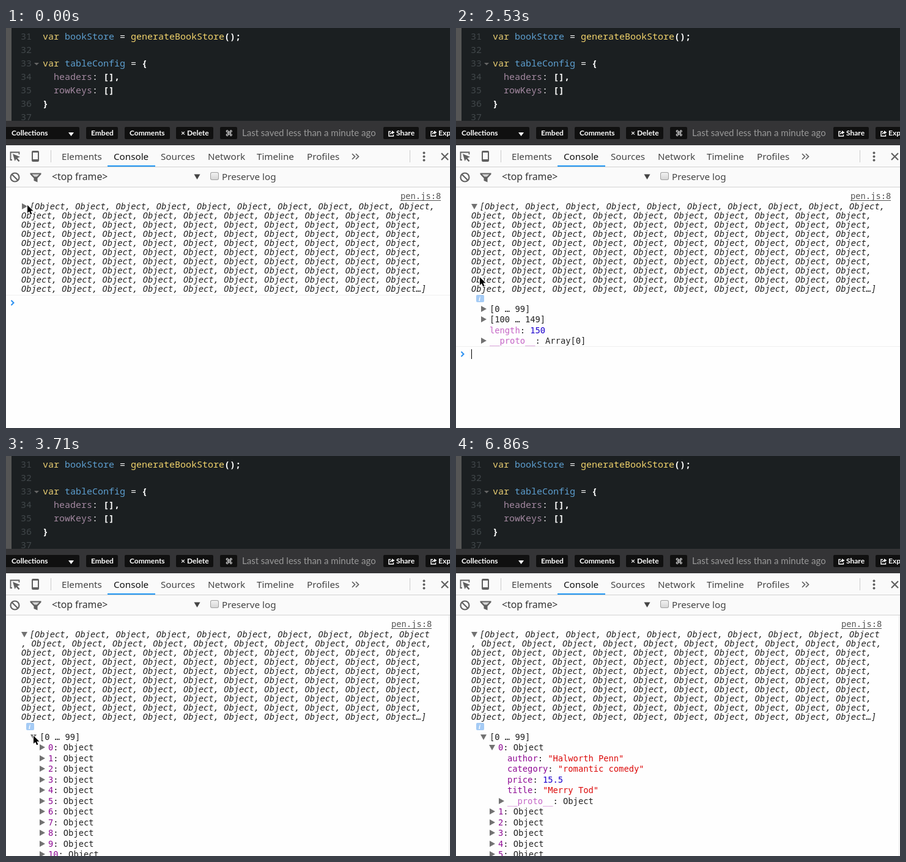
Write an HTML page with a canvas that moves like this. It is 726 px wide and 655 px high and loops after 7460 ms.

```html
<!DOCTYPE html>
<html lang="en">
<head>
<meta charset="utf-8">
<title>Console inspection</title>
<style>
html, body { margin: 0; width: 100%; height: 100%; overflow: hidden; background: #fefefe; }
canvas { display: block; }
</style>
</head>
<body>
<canvas id="stage" width="726" height="655"></canvas>
<script>
const ctx = document.getElementById('stage').getContext('2d');
const LOOP = 7460;
const MONO = '13.75px "DejaVu Sans Mono", monospace';
const CODE = '15px "Noto Sans Mono", monospace';
const LABEL = 'bold 12px Lato, sans-serif';
const TAB = '15.2px "Noto Sans", sans-serif';
const INK = '#222', KEY = '#8e0a94', DIM = '#c565c6', NUM = '#1c00cf', STR = '#dc0a0a';
const ICON = '#606060', WHITE = '#fff';
const ROW = 17.5;

// Pointer tip: [start time, x, y]; hidden where no place is given.
const POINTER = [
  [0, 35, 290], [740, 34, 290], [890, 32, 290], [1040, 31, 289], [1190, 30, 289],
  [2230, 31, 306], [2380, 36, 365], [2530, 39, 408], [2680, 41, 432], [2830, 42, 446],
  [2970, 43, 453], [3120, 44, 457], [3270, 44, 458], [3420, 45, 458],
  [4460, 48, 462], [4610, 54, 469], [4760, 59, 475], [4910, 62, 478],
  [6560, 190, 515], [6710, 566, 623], [6860]
];
const BLINKS = [300, 740, 1190, 1930, 2380, 2830, 3270];

function rect(x, y, w, h, color, radius = 0) {
  ctx.fillStyle = color;
  ctx.beginPath();
  ctx.roundRect(x, y, w, h, radius);
  ctx.fill();
}

function text(str, x, y, color, font) {
  ctx.font = font;
  ctx.fillStyle = color;
  ctx.fillText(str, x, y);
  return x + ctx.measureText(str).width;
}

// Parts alternate between string and colour.
function run(x, y, font, ...parts) {
  for (let i = 0; i < parts.length; i += 2) x = text(parts[i], x, y, parts[i + 1], font);
}

function shape(d, color, x = 0, y = 0, width = 0) {
  ctx.save();
  ctx.translate(x, y);
  const path = new Path2D(d);
  if (width) {
    ctx.strokeStyle = color;
    ctx.lineWidth = width;
    ctx.stroke(path);
  } else {
    ctx.fillStyle = color;
    ctx.fill(path);
  }
  ctx.restore();
}

function disc(x, y, r, color) {
  ctx.fillStyle = color;
  ctx.beginPath();
  ctx.arc(x, y, r, 0, 7);
  ctx.fill();
}

function toggle(x, y, open) {
  shape(open ? 'M-5-4H5L0 5Z' : 'M-4-5 5 0-4 5Z', '#727272', x, y);
}

function drawEditor() {
  const yellow = '#e8cd72', blue = '#5d9fd0', mauve = '#a388a0', bold = 'bold ' + CODE;
  rect(0, 0, 726, 152, '#1b1f21');
  rect(0, 0, 9, 152, '#555');
  for (let i = 0; i < 7; i++) text(31 + i, 24, 19 + 22 * i, '#41474a', CODE);
  shape('M46 57H54L50 61Z', '#666');
  run(60, 19, CODE, 'var ', yellow, 'bookStore ', blue, '= ', WHITE, 'generateBookStore', '#f2d46c');
  text('();', 357, 19, WHITE, bold);
  run(60, 63, CODE, 'var ', yellow, 'tableConfig ', blue, '= ', WHITE);
  text('{', 222, 63, WHITE, bold);
  run(78, 85, CODE, 'headers', mauve, ':', WHITE);
  text('[],', 159, 85, WHITE, bold);
  run(78, 107, CODE, 'rowKeys', mauve, ':', WHITE);
  text('[]', 159, 107, WHITE, bold);
  text('}', 60, 129, WHITE, bold);
}

function drawFooter() {
  rect(0, 152, 726, 40, '#343436');
  for (const [x, w] of [[-4, 124], [131, 52], [194, 74], [278, 61], [350, 28], [617, 58], [686, 50]])
    rect(x, 162, w, 20, '#101010', 2);
  const labels = [['Collections', 9], ['Embed', 139], ['Comments', 202], ['×', 286],
    ['Delete', 296], ['Share', 638], ['Export', 707]];
  for (const [str, x] of labels) text(str, x, 176, WHITE, LABEL);
  text('⌘', 358, 177, WHITE, '13px "DejaVu Sans", sans-serif');
  text('Last saved less than a minute ago', 386, 177, '#999', '15px Lato, sans-serif');
  shape('M102 171H111L106.500 177Z', WHITE);
  for (const x of [625, 694]) {
    shape('M4 1.500H1V9H8.500V6.500M3.500 6Q4 3 7 3', WHITE, x, 168, 1.4);
    shape('M6 0 10.500 3 6 6Z', WHITE, x, 168);
  }
}

function drawTools() {
  rect(0, 192, 726, 69, '#fafafa');
  rect(0, 227, 726, 1, '#d2d2d2');
  rect(0, 260, 726, 1, '#d2d2d2');
  rect(166, 225, 78, 2, '#2196f3');
  rect(73, 200, 1, 20, '#ccc');
  rect(660, 200, 1, 20, '#ccc');
  const tabs = [['Elements', 91], ['Console', 176], ['Sources', 253], ['Network', 330],
    ['Timeline', 410], ['Profiles', 492]];
  for (const [str, x] of tabs) text(str, x, 216, str === 'Console' ? '#111' : '#444', TAB);

  // Inspect, device, overflow, menu and close icons
  shape('M10 216H7.500V203.500H21.500V207', ICON, 0, 0, 1.8);
  shape('M11 206 23 211 18.500 213 22.500 217.500 20.500 219 16.500 214.500 14.500 218Z', ICON);
  rect(42, 201, 12, 18, ICON, 2);
  rect(44, 204, 8, 11, '#fafafa');
  shape('M566 206 570.500 210.500 566 215M572 206 576.500 210.500 572 215', ICON, 0, 0, 1.7);
  for (const y of [204.5, 210.5, 216.5]) disc(683.5, y, 2, ICON);
  shape('M712 205 723 216M723 205 712 216', ICON, 0, 0, 2.2);

  // Clear, filter and frame controls
  ctx.beginPath();
  ctx.arc(14.5, 244.5, 7, 0, 7);
  ctx.strokeStyle = ICON;
  ctx.lineWidth = 2.2;
  ctx.stroke();
  shape('M9.500 239.500 19.500 249.500', ICON, 0, 0, 2.2);
  shape('M39.500 237.500H57.500V239.500L51.500 246V252.500L45.500 250V246L39.500 239.500Z', ICON);
  shape('M42.500 239.500H54.500L50.500 243.500H46.500Z', '#d5d5d5');
  text('<top frame>', 75, 249, '#333', '15.8px "Noto Sans", sans-serif');
  shape('M307.500 239.500H317.500L312.500 248Z', '#444');
  const shade = ctx.createLinearGradient(0, 236, 0, 249);
  shade.addColorStop(0, '#f4f4f4');
  shade.addColorStop(1, '#d4d4d4');
  rect(334, 236, 14, 13, '#a0a0a0', 3);
  rect(335, 237, 12, 11, shade, 2);
  text('Preserve log', 353, 249, '#444', TAB);
}

function drawSummary(open, narrow) {
  const link = narrow ? 630 : 645;
  text('pen.js:8', link, 280, '#555', MONO);
  rect(link, 282, 66, 1, '#555');
  toggle(30, 292, open);
  const list = Array(10).fill('Object').join(', ');
  for (let i = 0; i < 10; i++) {
    let line = list + ',';
    if (i === 0) line = '[' + list + (narrow ? '' : ',');
    if (i === 1 && narrow) line = ', ' + line;
    if (i === 9) line = list + '…]';
    text(line, i ? 25 : 38.7, 297 + 15 * i, INK, 'italic ' + MONO);
  }
  if (open) {
    rect(33, 437, 13, 12, '#a5cbf5', 2);
    text('i', 37, 447, WHITE, 'italic bold 11px "Liberation Serif", serif');
  }
}

function prompt(y, caret) {
  rect(0, y - 13, 726, 1, '#f0f0f0');
  shape('M8.500-4 12.500 0 8.500 4', '#2a8ff0', 0, y, 2);
  if (caret) rect(25, y - 8, 1, 16, '#000');
}

// One tree line; index 0 is the first line under the summary.
function branch(index, x, open, ...parts) {
  const y = Math.round(460 + ROW * index - 0.2);
  if (open !== null) toggle(x - 10, y, open);
  run(x, y + 5, MONO, ...parts);
}

function drawTree(t) {
  const expanded = t >= 3710, detail = t >= 5360;
  branch(0, 55, t >= 3570, '[0 … 99]', INK);
  if (!expanded) {
    branch(1, 55, false, '[100 … 149]', INK);
    branch(2, 55, null, 'length', DIM, ': ', INK, '150', NUM);
    branch(3, 55, false, '__proto__', DIM, ': Array[0]', INK);
    return;
  }
  for (let i = 0; i < 11; i++)
    branch(1 + i + (detail && i ? 5 : 0), 69, detail && !i, String(i), KEY, ': Object', INK);
  if (!detail) return;
  const fields = [['author', '"Halworth Penn"', STR], ['category', '"romantic comedy"', STR],
    ['price', '15.5', NUM], ['title', '"Merry Tod"', STR]];
  fields.forEach(([key, value, color], i) => branch(2 + i, 84, null, key, KEY, ': ', INK, value, color));
  branch(6, 84, false, '__proto__', DIM, ': Object', INK);
}

function drawPointer(t) {
  const [, x, y] = POINTER.findLast(([start]) => start <= t);
  if (x === undefined) return;
  const arrow = 'M0 0V13L3 10.300 5.200 15.200 7.500 14.200 5.300 9.500H9.500Z';
  shape(arrow, WHITE, x, y, 2);
  shape(arrow, '#000', x, y);
}

function draw(t) {
  const open = t >= 1490, narrow = t >= 3710;
  const caret = BLINKS.filter(time => time <= t).length % 2 === 1;
  rect(0, 0, 726, 655, '#fefefe');
  drawEditor();
  drawFooter();
  drawTools();
  drawSummary(open, narrow);
  if (open) drawTree(t);
  if (narrow) rect(724, 261, 1, 394, '#e8e8e8');
  else prompt(open ? 534 : 450, caret);
  drawPointer(t);
}

const begin = performance.now();
function tick() {
  draw((performance.now() - begin) % LOOP);
  requestAnimationFrame(tick);
}
tick();
</script>
</body>
</html>
```
